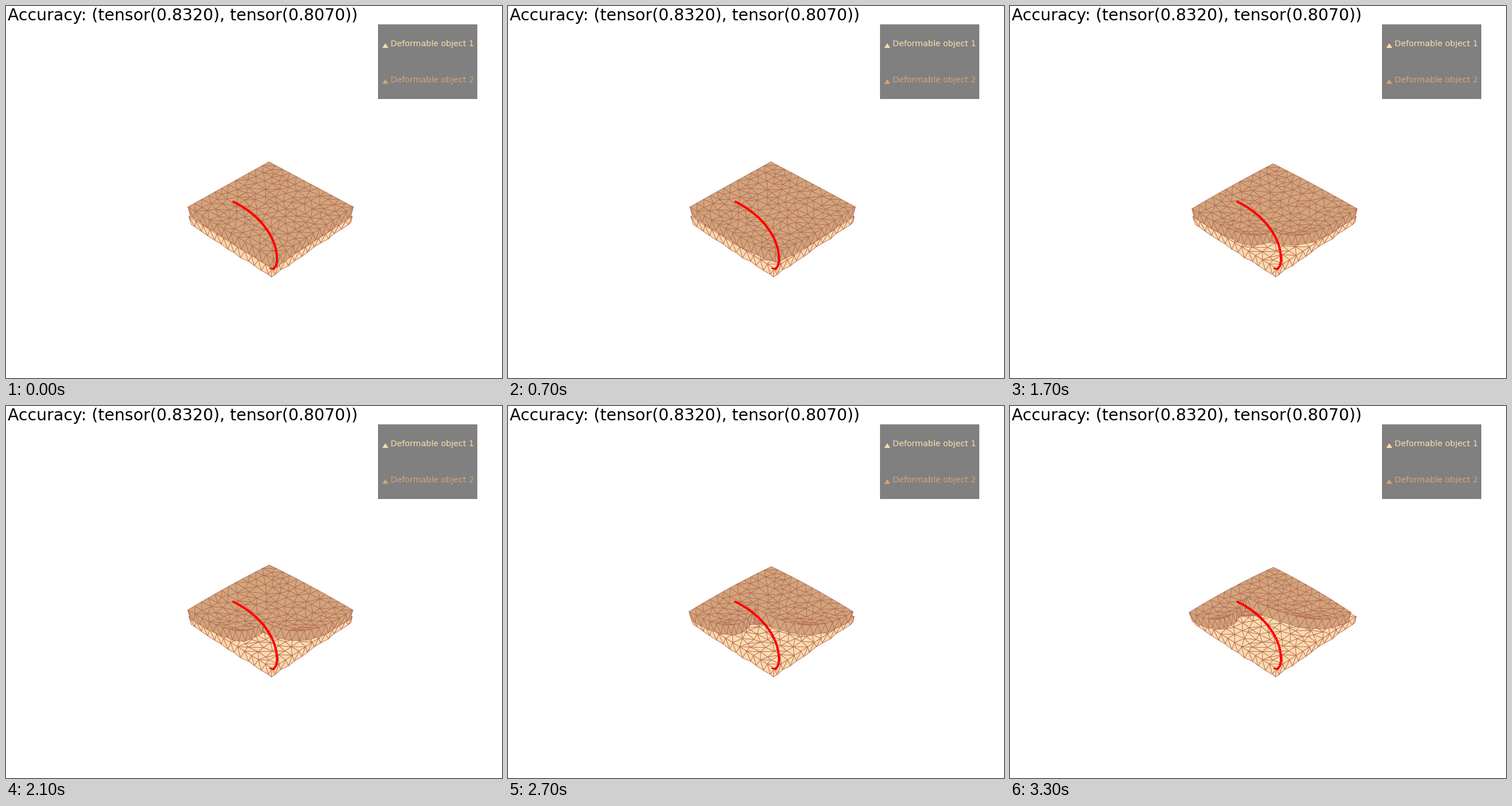
Animation, 864 px wide and 648 px high, one loop 3400 ms. Source, as a matplotlib script:

```python
import numpy as np
import matplotlib.pyplot as plt
from matplotlib.animation import FuncAnimation
from matplotlib.collections import PolyCollection
from matplotlib.patches import Polygon, Rectangle
from matplotlib.tri import Triangulation

W, H, DPI = 864, 648, 100
FRAMES, STEP = 34, 100
PX = 72 / DPI
LIGHT, DARK, EDGE = "#ffdbac", "#d2a57a", "#b46e5c"
N = 12  # cells along each side of a slab


def vec(x, y):
    return np.array([x, y], float)


def lerp(a, b, q):
    return a + (b - a) * np.asarray(q, float)[..., None]


def rim(left, front, right, pull=vec(0, 0), power=1.0):
    """Two edges running from a side corner to the front; pull moves the front."""
    def edge(corner):
        return lambda q: lerp(corner, front, q) + lerp(0 * pull, pull, np.power(q, power))
    return edge(left), edge(right)


class Slab:
    """Jittered triangle mesh of a top face and its two front walls."""

    def __init__(self, seed):
        rng = np.random.default_rng(seed)
        self.grid = np.linspace(0, 1, N + 1)
        u, v = np.meshgrid(self.grid, self.grid, indexing="ij")
        for axis in (u, v):
            axis[1:-1, 1:-1] += rng.uniform(-0.3, 0.3, (N - 1, N - 1)) / N
        self.u, self.v = u.ravel(), v.ravel()
        tri = Triangulation(self.u, self.v).triangles
        self.tri = tri[np.argsort((self.u + self.v)[tri].mean(axis=1))]
        self.low = np.r_[0, (np.arange(N) + 0.5) / N, 1]
        self.rough = rng.uniform(-1.3, 1.3, (2, N + 2, 2))
        self.rough[:, [0, -1]] = 0

    def face(self, edges, back, bulge):
        """Coons patch between the two front edges and the two back edges."""
        u, v = self.u, self.v
        U, V = u[:, None], v[:, None]
        (left, front), right = (edges[0](q) for q in (0, 1)), edges[1](0)
        arch = lambda q: lerp(0 * bulge, bulge, 4 * q * (1 - q))
        to_right, to_left = lerp(back, right, v), lerp(back, left, u)
        flat = (1 - U) * to_right + U * lerp(left, front, v)
        pts = ((1 - U) * (to_right + arch(v)) + U * edges[0](v)
               + (1 - V) * (to_left + arch(u)) + V * edges[1](u) - flat)
        return pts[self.tri]

    def walls(self, top, low):
        tris = []
        for upper, lower, rough in zip(top, low, self.rough):
            a, b = upper(self.grid), lower(self.low) + rough
            for k in range(N + 1):
                tris.append([a[k], b[k], b[k + 1]])
                if k < N:
                    tris.append([a[k], a[k + 1], b[k + 1]])
        return np.array(tris)

    def triangles(self, top, low, back, bulge=vec(0, 0)):
        return np.concatenate([self.face(top, back, bulge), self.walls(top, low)])


fig = plt.figure(figsize=(W / DPI, H / DPI), dpi=DPI, facecolor="white")
ax = fig.add_axes([0, 0, 1, 1])
ax.set(xlim=(0, W), ylim=(H, 0))
ax.axis("off")


def label(x, y, text, size, color):
    ax.text(x, y, text, fontsize=size * PX, color=color,
            family="DejaVu Sans", va="baseline")


def mesh(color, z, verts):
    return ax.add_collection(PolyCollection(
        verts, facecolor=color, edgecolor=EDGE, linewidth=0.9 * PX,
        joinstyle="round", zorder=z), autolim=False)


label(3, 25, "Accuracy: (tensor(0.8320), tensor(0.8070))", 28.4, "black")

ax.add_patch(Rectangle((648, 32), 173, 130, color="#808080", lw=0))
for k, color in enumerate((LIGHT, DARK)):
    y = 70 + 62.5 * k
    ax.add_patch(Polygon([(655.5, y + 3), (666, y + 3), (660.7, y - 5)], color=color, lw=0))
    label(669.5, y, f"Deformable object {k + 1}", 14.2, color)

base, cover = Slab(3), Slab(8)
mesh(LIGHT, 2, base.triangles(rim(vec(318.5, 367), vec(464, 457), vec(603, 367)),
                              rim(vec(323, 381), vec(462, 472), vec(601, 377)),
                              vec(458, 290)))
cover_mesh = mesh(DARK, 3, [])

# Red path: a cubic Bezier arc with a short hook at its lower end
q = np.linspace(0, 1, 60)[:, None]
arc = ((1 - q) ** 3 * vec(396, 341) + 3 * q * (1 - q) ** 2 * vec(436, 360)
       + 3 * q ** 2 * (1 - q) * vec(474, 400) + q ** 3 * vec(472, 445))
path = np.vstack([arc, vec(470, 453), vec(466, 458)])
ax.plot(*path.T, color="red", lw=4 * PX, solid_capstyle="round", zorder=4)
ax.plot([460, 467], [457, 458.5], color="red", lw=2.5 * PX, zorder=4)


def draw(i):
    x = i / (FRAMES - 1)
    p = x - x * (1 - x) ** 3        # slow start, then a steady lift
    s = np.clip((x - 0.2) / 0.8, 0, 1)
    sag = 9.5 * s * s * (3 - 2 * s)
    slide = p ** 5                  # side corners give way at the end

    low = vec(321 - 3 * slide, 366 + sag), vec(465, 458), vec(601 - 11 * slide, 366 + sag)
    lift = vec(-4 - 2 * slide, -16), vec(1, -17), vec(4, -16)
    top = [c + d for c, d in zip(low, lift)]
    bend = dict(pull=vec(12 * p - 66 * p * p, -108 * p), power=4.5 - 2.7 * p)
    cover_mesh.set_verts(cover.triangles(rim(*top, **bend), rim(*low, **bend),
                                         vec(458 + p, 271.5 + sag), vec(0, -3 * p)))
    return cover_mesh,


anim = FuncAnimation(fig, draw, frames=FRAMES, interval=STEP, repeat=True, repeat_delay=0)
plt.show()
```
